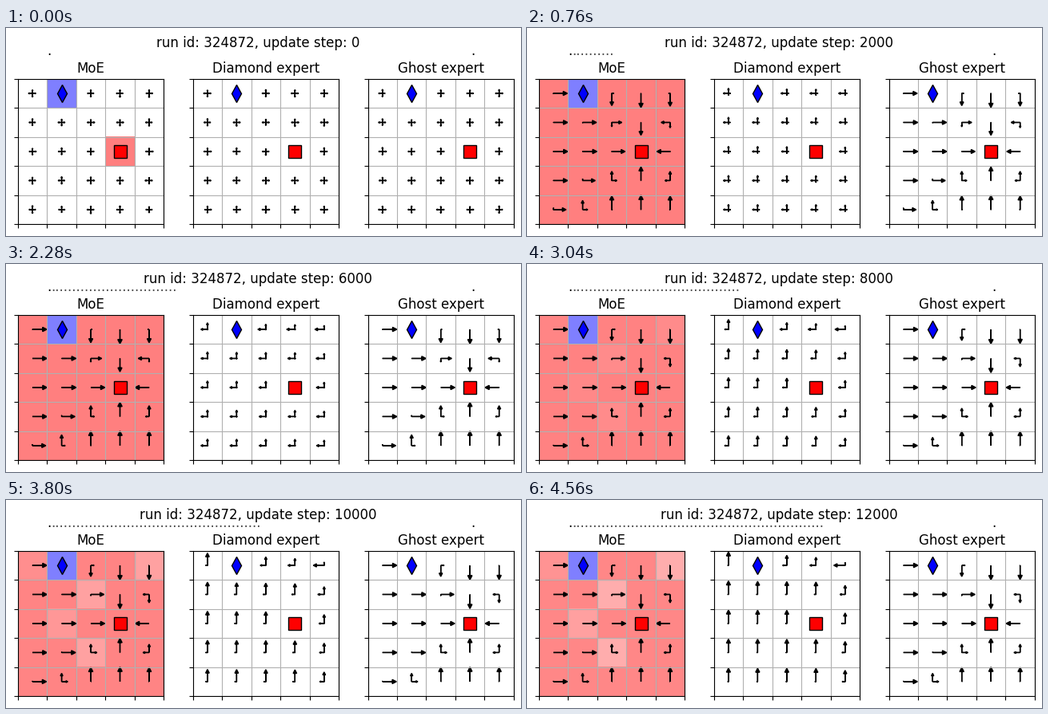
Animation, 644 px wide and 261 px high, one loop 5.56 s. Source, as a matplotlib script:

```python
import numpy as np
import matplotlib.pyplot as plt
from matplotlib.animation import FuncAnimation
from matplotlib.collections import PolyCollection

W, H, DPI = 644, 261, 100
TICK_MS, HOLD_MS, LAST_STAGE = 20, 380, 12
N_FRAMES = 278
LEFT, BOTTOM, SIDE = 14.86, 14.86, 182.35
GAP = (620 - SIDE) / 2
DIAMOND, SQUARE = (1, 0), (3, 2)
CELLS = np.array([(c, r) for r in range(5) for c in range(5)
                  if (c, r) not in (DIAMOND, SQUARE)])
COL, ROW = CELLS.T
# Right, up, left, down, with y pointing down.
DIRS = np.array([(1, 0), (0, -1), (-1, 0), (0, 1)])
# Unit arrow: distance along its direction and to the side.
ALONG = np.array([0, .35, .35, .5, .35, .35])
ASIDE = np.array([0, 0, .075, 0, -.075, 0])
UNSURE = [(0, 0), (4, 0), (2, 1), (1, 2), (2, 3)]


def sigmoid(x):
    return 1 / (1 + np.exp(-x))


def mix(focus, right, up, left, down):
    """Blend a policy with the uniform one."""
    policy = np.stack([right, up, left, down], axis=1)
    return focus * policy + (1 - focus) / 4


def ghost_policy(stage):
    """Head for the square, along the longer axis first."""
    dx, dy = SQUARE[0] - COL, SQUARE[1] - ROW
    swing = min(stage / 4, 1) * np.clip((8 - stage) / 1.5, 0, 1)
    settled = np.where((dx > 0) & (dy > 0), 2.3, -.3) * min(stage / 8, 1)
    gain = 3.5 * min(1, .5 + stage / 8)
    across = sigmoid(gain * (abs(dx) - abs(dy))
                     + 1.1 * swing * np.sign(dy) + (1 - swing) * settled)
    return mix(1 - np.exp(-2 * stage),
               across * (dx > 0), (1 - across) * (dy < 0),
               across * (dx < 0), (1 - across) * (dy > 0))


def diamond_policy(stage):
    """Go left at first, then turn up; the top right turns last."""
    late = max(stage - 6, 0)
    drag = 2.6 * np.sqrt(COL / 4) / (1 + ROW) ** 1.5 + 1.2 * (COL / 4) ** 8
    up = sigmoid(.5 * late - (.25 + .15 * late) * drag)
    none = np.zeros(len(CELLS))
    return mix(1 - np.exp(-stage / 3.5), none, up, 1 - up, none)


def cell_colors(stage):
    img = np.ones((5, 5, 3))
    if stage:
        img[..., 1:] = .5 + .005 * max(stage - 6, 0)
        fade = np.clip((stage - 7) / 4, 0, 1)
        for c, r in UNSURE:
            img[r, c, 1:] += fade * (.05 + .05 * min(c, 2))
    else:
        img[SQUARE[1], SQUARE[0]] = 1, .5, .5
    img[DIAMOND[1], DIAMOND[0]] = .5, .5, 1
    return img


def arrow_shapes(probs):
    """Outlines of four arrows per cell, scaled by probability."""
    normals = DIRS[:, ::-1] * (-1, 1)
    unit = (ALONG[:, None] * DIRS[:, None]
            + ASIDE[:, None] * normals[:, None])
    shapes = CELLS[:, None, None] + .5 + probs[..., None, None] * unit
    return shapes.reshape(-1, len(ALONG), 2)


def make_panel(index, title):
    ax = fig.add_axes([(LEFT + index * GAP) / W, BOTTOM / H, SIDE / W, SIDE / H])
    ax.set(xlim=(0, 5), ylim=(5, 0), xticks=range(6), yticks=range(6))
    ax.tick_params(labelbottom=False, labelleft=False)
    ax.grid(True)
    ax.set_title(title, fontsize=12, pad=5.28)
    for (c, r), marker, color in ((DIAMOND, "d", "blue"), (SQUARE, "s", "red")):
        ax.plot(c + .5, r + .5, marker, ms=11, mfc=color, mec="black", mew=1)
    arrows = PolyCollection([], facecolors="black", edgecolors="black",
                            linewidths=1, joinstyle="miter")
    ax.add_collection(arrows, autolim=False)
    return ax, arrows


fig = plt.figure(figsize=(W / DPI, H / DPI), dpi=DPI, facecolor="white")
panels = [make_panel(i, name) for i, name in
          enumerate(("MoE", "Diamond expert", "Ghost expert"))]
cells = panels[0][0].imshow(cell_colors(0), extent=(0, 5, 5, 0),
                            aspect="auto", interpolation="nearest")
header = fig.text(314.86 / W, 250.54 / H, "", fontsize=12, ha="center", va="top")

# Progress row: fixed end dots, one more dot per 200 steps.
DOT_X, DOT_Y, DOT_STEP = 51, 1 - 34 / H, 5.3
for x in (DOT_X, DOT_X + 100 * DOT_STEP):
    fig.text(x / W, DOT_Y, ".", fontsize=12)
dots = fig.text((DOT_X + DOT_STEP) / W, DOT_Y, "", fontsize=12, color="0.3")

noise = np.random.default_rng(4).normal(0, .02, (3, len(CELLS), 4))


def stage_shapes(stage):
    ghost = ghost_policy(stage)
    policies = np.array([ghost, diamond_policy(stage), ghost])
    probs = np.clip(policies + noise * np.exp(-stage), 0, 1)
    return [arrow_shapes(p) for p in probs]


stages = [stage_shapes(s) for s in range(LAST_STAGE + 1)]


def update(i):
    stage = min(i * TICK_MS // HOLD_MS, LAST_STAGE)
    header.set_text(f"run id: 324872, update step: {stage * 1000}")
    dots.set_text("." * (5 * stage))
    cells.set_data(cell_colors(stage))
    for (_, arrows), shapes in zip(panels, stages[stage]):
        arrows.set_verts(shapes)
    return []


anim = FuncAnimation(fig, update, frames=N_FRAMES, interval=TICK_MS,
                     init_func=lambda: update(0), repeat=True, repeat_delay=0)
plt.show()
```
